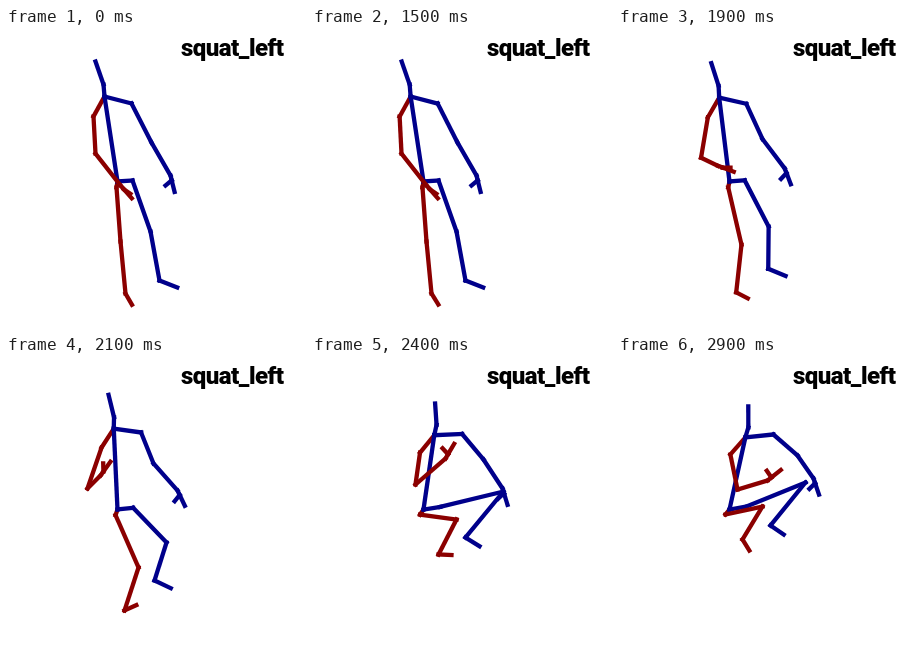
Animation of 300 by 300 pixels, one loop 3000 ms. Source, as an HTML page with a canvas:

```html
<!DOCTYPE html>
<html lang="en">
<head>
<meta charset="utf-8">
<title>Squat</title>
<style>
  html, body { margin: 0; width: 100%; height: 100%; overflow: hidden; background: #fff; }
  canvas { display: block; }
</style>
</head>
<body>
<canvas id="stage" width="300" height="300"></canvas>
<script>
const ctx = document.getElementById('stage').getContext('2d');
const LOOP = 3000, STEP = 100;
const BLUE = '#00008b', RED = '#8b0000';
const PELVIS = [111, 153];

// Limb joints pass four key points: standing, dropping, bent, crouched.
const KEY_TIMES = [1600, 2100, 2400, 2900];
const leftElbow = [[145, 114], [147, 107], [171, 103], [179, 99]];
const leftWrist = [[164, 147], [171, 134], [190, 132], [195, 122]];
const leftKnee = [[144, 203], [160, 186], [191, 135], [187, 126]];
const leftAnkle = [[153, 252], [148, 224], [153, 181], [152, 169]];
const rightElbow = [[89, 125], [81, 132], [103, 128], [119, 133]];
const rightWrist = [[114, 157], [94, 119], [133, 102], [149, 124]];
const rightKnee = [[114, 213], [132, 211], [144, 163], [144, 150]];
const rightAnkle = [[119, 265], [118, 254], [126, 198], [124, 183]];

const mix = (a, b, p) => a + (b - a) * p;
const polar = ([x, y], length, angle) =>
  [x + length * Math.cos(angle), y + length * Math.sin(angle)];

// Smooth Hermite curve through the key points, resting at both ends.
function follow(points, time) {
  const last = KEY_TIMES.length - 1;
  const t = Math.min(Math.max(time, KEY_TIMES[0]), KEY_TIMES[last]);
  const i = Math.min(KEY_TIMES.findLastIndex(k => k <= t), last - 1);
  const span = KEY_TIMES[i + 1] - KEY_TIMES[i];
  const s = (t - KEY_TIMES[i]) / span;
  const slope = (k, axis) => k === 0 || k === last ? 0 :
    (points[k + 1][axis] - points[k - 1][axis]) / (KEY_TIMES[k + 1] - KEY_TIMES[k - 1]);
  return [0, 1].map(axis =>
    mix(points[i][axis], points[i + 1][axis], s * s * (3 - 2 * s)) +
    span * s * (1 - s) * (slope(i, axis) * (1 - s) - slope(i + 1, axis) * s));
}

function bones(color, ...points) {
  ctx.strokeStyle = color;
  for (let i = 1; i < points.length; i++) {
    ctx.beginPath();
    ctx.moveTo(...points[i - 1]);
    ctx.lineTo(...points[i]);
    ctx.stroke();
  }
}

// The hand continues the forearm; the thumb turns away from it by spread.
function arm(color, shoulder, elbow, wrist, spread) {
  const angle = Math.atan2(wrist[1] - elbow[1], wrist[0] - elbow[0]);
  const hand = polar(wrist, 5, angle + spread * 0.2);
  bones(color, shoulder, elbow, wrist, hand, polar(hand, 12, angle + spread * 0.2));
  bones(color, hand, polar(hand, 8, angle + spread));
}

function leg(color, hip, knee, ankle, footLength, footAngle) {
  bones(color, hip, knee, ankle, polar(ankle, footLength, footAngle));
}

function drawBody(time) {
  const depth = 1 / (1 + Math.exp((2200 - time) / 132));
  const swing = 4 * depth * (1 - depth);
  const lower = (from, to) => from.map((v, axis) => mix(v, to[axis], depth));
  const at = points => follow(points, time);

  const head = lower([89, 33], [130, 50]);
  const neck = lower([97, 56], [130, 71]);
  const chest = lower([98, 68], [127, 81]);
  const leftShoulder = lower([125, 75], [155, 78]);
  const rightShoulder = lower([87, 88], [112, 98]);
  const leftHip = lower([126, 152], [128, 150]);
  const rightHip = lower([110, 159], [107, 158]);

  bones(RED, chest, rightShoulder);
  bones(RED, PELVIS, rightHip);
  bones(BLUE, head, neck, chest, PELVIS, leftHip);
  bones(BLUE, chest, leftShoulder);
  arm(BLUE, leftShoulder, at(leftElbow), at(leftWrist), 1.4);
  leg(BLUE, leftHip, at(leftKnee), at(leftAnkle), mix(19, 16, depth), mix(0.37, 0.6, depth));
  arm(RED, rightShoulder, at(rightElbow), at(rightWrist), mix(-0.3, -1.9, depth));
  leg(RED, rightHip, at(rightKnee), at(rightAnkle), 13, 1.05 - 1.7 * swing);
}

function draw() {
  const time = Math.floor(performance.now() % LOOP / STEP) * STEP;
  ctx.setTransform(1, 0, 0, 1, 0, 0);
  ctx.fillStyle = '#fff';
  ctx.fillRect(0, 0, 300, 300);

  ctx.fillStyle = '#000';
  ctx.font = '900 24px Roboto, sans-serif';
  ctx.letterSpacing = '-0.5px';
  ctx.fillText('squat_left', 175, 28);

  ctx.translate(0.5, 0.5);
  ctx.lineWidth = 4.3;
  ctx.lineCap = 'square';
  drawBody(time);
  requestAnimationFrame(draw);
}
draw();
</script>
</body>
</html>
```
